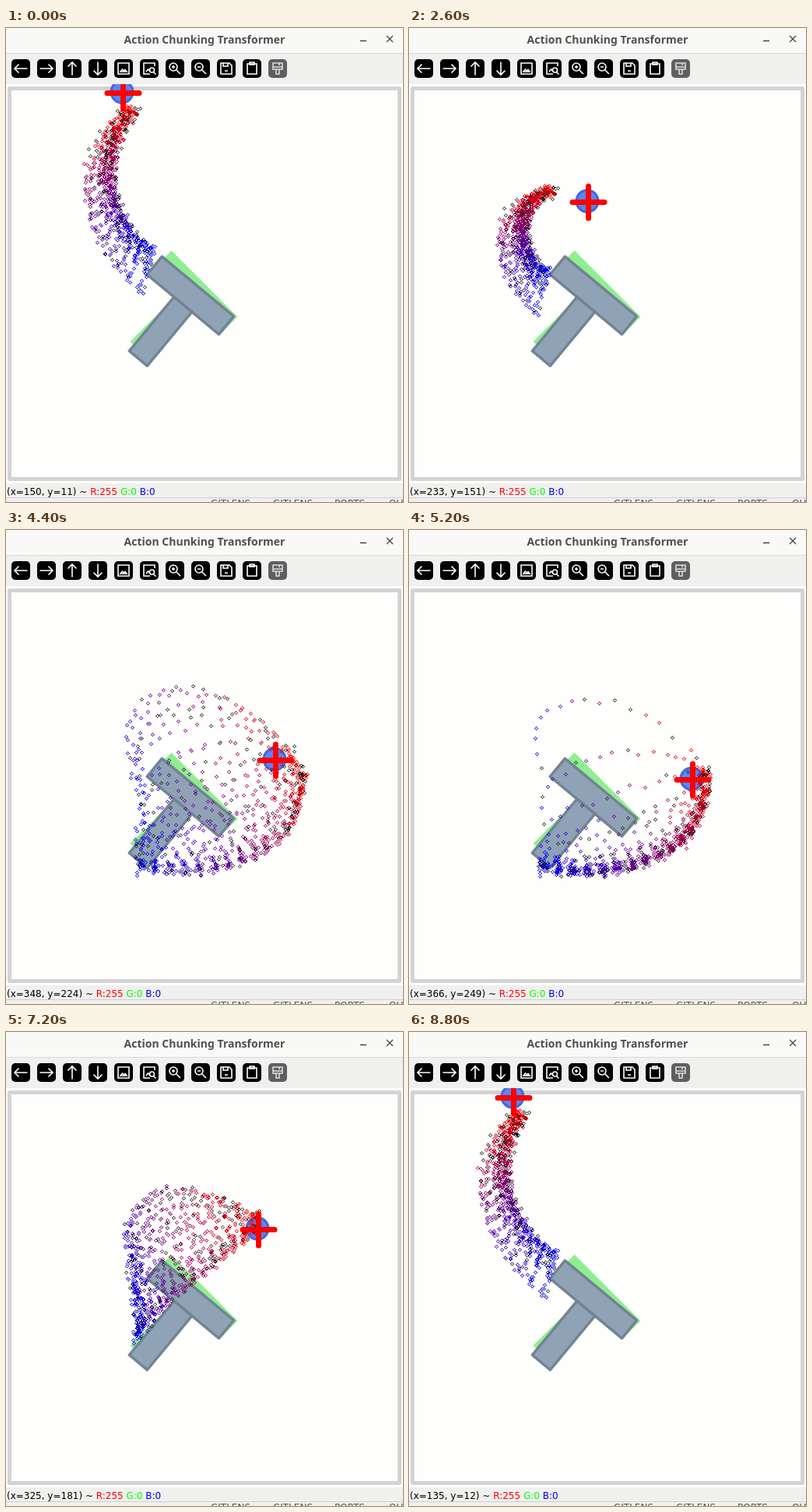
Write an HTML page with a canvas that moves like this. It is 510x608 px and loops after 8990 ms.

```html
<!DOCTYPE html>
<html lang="en">
<head>
<meta charset="utf-8">
<title>Action Chunking Transformer</title>
<style>
html, body { margin: 0; width: 100%; height: 100%; overflow: hidden; background: #f0f0ee; }
canvas { display: block; }
</style>
</head>
<body>
<canvas id="stage" width="510" height="608"></canvas>
<script>
const ctx = document.getElementById('stage').getContext('2d');
const LOOP = 8990, HOLD = 800, STEPS = 120, STEP = 200 / 3;
const SAMPLES = 50, HORIZON = 16, TOP = 72;
const SANS = '12px "DejaVu Sans", sans-serif';

// Blends numbers, or lists of them at any depth
const mix = (a, b, u) => Array.isArray(a) ? a.map((v, i) => mix(v, b[i], u)) : a + (b - a) * u;
const linear = u => u;
const easeIn = u => u * u;
const easeOut = u => 1 - (1 - u) ** 2;

// Bezier paths of the predicted motion
const rise = [[184, 284], [125, 240], [120, 160], [163, 107]];
const lift = [[174, 312], [140, 290], [135, 225], [182, 209]];
const over = [[170, 285], [105, 165], [270, 150], [356, 274]];
const under = [[173, 432], [265, 450], [385, 425], [380, 315]];
const hook = [[175, 290], [125, 250], [150, 175], [270, 186]];
const lean = path => path.map(([x, y], i) => [x - 6 * i, y]);
const fan = path => path.map(([x, y], i) => [x - 12 - 30 * Math.sin(i), y + 55 * (1 - i / 3) ** 2]);

// Samples spread between the paths near and far: bias favours far,
// drop lowers the starts, ease leads to the next pose
const poses = [
  { time: 800, cursor: [150, 83], mouse: [150, 11], near: rise, far: fan(rise), bias: -1.1, drop: 0, ease: easeOut },
  { time: 2600, cursor: [230, 223], mouse: [233, 151], near: lift, far: fan(lift), bias: -1.2, drop: 0, ease: linear },
  { time: 3670, cursor: [329, 273], mouse: [331, 202], near: over, far: under, bias: -.6, drop: 130, ease: linear },
  { time: 5200, cursor: [364, 320], mouse: [366, 249], near: over, far: under, bias: 3.3, drop: 0, ease: linear },
  { time: 6470, cursor: [350, 294], mouse: [351, 222], near: over, far: under, bias: 1.1, drop: 110, ease: linear },
  { time: 8000, cursor: [295, 208], mouse: [296, 136], near: hook, far: fan(hook), bias: -.5, drop: 0, ease: easeIn },
  { time: 8800, cursor: [134, 84], mouse: [135, 12], near: lean(rise), far: fan(lean(rise)), bias: -1.1, drop: 0 }
];

let seed = 7;
function random() {
  seed = (seed * 16807) % 2147483647;
  return seed / 2147483647;
}
const gauss = () => (random() + random() + random() + random() - 2) * 1.73;

const dots = [];
for (let i = 0; i < SAMPLES; i++) {
  const rank = (i + .5) / SAMPLES, logit = Math.log(rank / (1 - rank));
  const sx = gauss() * 3, sy = gauss() * 3, fall = random();
  for (let j = 0; j < HORIZON; j++) {
    const p = j / (HORIZON - 1);
    dots.push({
      p, logit, fall,
      dx: sx + gauss() * 2.2, dy: sy + gauss() * 2.2,
      color: random() < .25 ? '#222' : `rgb(${255 * p | 0},0,${255 * (1 - p) | 0})`
    });
  }
}

const diamond = new Path2D();
for (let x = -2; x <= 2; x++) {
  const y = 2 - Math.abs(x);
  diamond.rect(x, y, 1, 1);
  if (y) diamond.rect(x, -y, 1, 1);
}

function poseAt(t) {
  const n = Math.max(0, poses.findIndex(p => p.time >= t) - 1);
  const a = poses[n], b = poses[n + 1];
  const u = a.ease((t - a.time) / (b.time - a.time));
  const pose = {};
  for (const key of ['cursor', 'mouse', 'near', 'far', 'bias', 'drop']) pose[key] = mix(a[key], b[key], u);
  return pose;
}

// Point on a Bezier path by repeated blending
function along(path, p) {
  while (path.length > 1) path = path.slice(1).map((point, i) => mix(path[i], point, p));
  return path[0];
}

function rect(x, y, w, h, color) {
  ctx.fillStyle = color;
  ctx.fillRect(x, y, w, h);
}

function text(str, x, y, font, color, align = 'left') {
  ctx.font = font;
  ctx.fillStyle = color;
  ctx.textAlign = align;
  ctx.fillText(str, x, y);
  return x + ctx.measureText(str).width;
}

function line(d, color, width) {
  ctx.strokeStyle = color;
  ctx.lineWidth = width;
  ctx.stroke(new Path2D(d));
}

const arrow = 'M20.5 12H4M9.5 6.5L4 12l5.5 5.5';
const lens = 'M15 10a5 5 0 1 1-10 0a5 5 0 1 1 10 0M14 14l5 5';
const icons = [
  arrow, arrow, arrow, arrow,
  'M5 5h14v14H5zM8 16l2.5-3 2 2 1.5-1.5 2 2.5z',
  'M19 9V5H5v14h8M8 16l2.5-3 2 2M18.5 14a3 3 0 1 1-6 0a3 3 0 1 1 6 0M17.5 16.5l3 3',
  lens + 'M10 8v4M8 10h4',
  lens + 'M8 10h4',
  'M5 5h11l3 3v11H5zM8 5v4h6V5M10 15h4',
  'M6 6h12v13H6zM9 4h6v3H9z',
  'M6 5h12v8H6zM6 10h12M10 13v6h4v-6M14 5v3'
];
const turns = [0, 2, 1, 3];

function drawWindow() {
  rect(0, 0, 510, 608, '#f0f0ee');
  rect(0, 0, 510, 32, '#f9f9f7');
  rect(0, 32, 510, 1, '#dadad8');
  rect(0, 602, 510, 1, '#d0d0ce');
  text('Action Chunking Transformer', 255, 20, 'bold 14px "Noto Sans", sans-serif', '#505050', 'center');
  line('M455 16.5h8M489 10l8 8M497 10l-8 8', '#444', 1.3);
  icons.forEach((d, i) => {
    const off = i === icons.length - 1;
    ctx.save();
    ctx.translate(7 + 33 * i, 40);
    ctx.fillStyle = off ? '#5f5f5f' : '#000';
    ctx.beginPath();
    ctx.roundRect(0, 0, 24, 24, 5);
    ctx.fill();
    ctx.translate(12, 12);
    ctx.rotate((turns[i] || 0) * Math.PI / 2);
    ctx.translate(-12, -12);
    line(d, off ? '#ddd' : '#fff', 1.6);
    ctx.restore();
  });
  [['GITLENS', 263], ['GITLENS', 343], ['PORTS', 422], ['OUTPUT', 492]]
    .forEach(([label, x]) => text(label, x, 614, SANS, '#555'));
}

// T block placed by the middle of its top edge
function drawBlock(x, y, degrees, fill, edge) {
  ctx.save();
  ctx.translate(x, y);
  ctx.rotate(degrees * Math.PI / 180);
  ctx.fillStyle = fill;
  ctx.strokeStyle = edge;
  ctx.lineWidth = 3.5;
  for (const box of [[-60, 0, 120, 30], [-15, 30, 30, 90]]) {
    ctx.fillRect(...box);
    if (edge) ctx.strokeRect(...box);
  }
  ctx.restore();
}

function drawBoard() {
  rect(0, TOP, 510, 512, '#fefffc');
  ctx.lineJoin = 'round';
  line('M4.5 77.5h501v501h-501z', '#d3d3d3', 5);
  drawBlock(255, 328, 45, '#90ee90');
  drawBlock(246.5, 331.5, 39.7, '#8fa2b6', '#728494');
  ctx.lineJoin = 'miter';
}

function drawAgent([x, y]) {
  ctx.beginPath();
  ctx.arc(x - 1, y - 1, 14, 0, 7);
  ctx.fillStyle = '#5a86f6';
  ctx.fill();
  ctx.strokeStyle = '#4169e1';
  ctx.lineWidth = 3;
  ctx.stroke();
}

function drawCloud({ near, far, bias, drop }) {
  for (const d of dots) {
    const g = 1 / (1 + Math.exp(-1.5 * (d.logit + bias)));
    const [x, y] = along(mix(near, far, g), d.p);
    const sag = drop * d.fall * (1 - g) * (1 - d.p) ** 1.5;
    ctx.save();
    ctx.translate(Math.round(x + d.dx), Math.round(y + d.dy + sag));
    ctx.fillStyle = d.color;
    ctx.fill(diamond);
    ctx.restore();
  }
}

function drawCross([x, y]) {
  ctx.lineCap = 'round';
  line(`M${x - 20} ${y + .5}h41M${x + .5} ${y - 20}v41`, '#f00', 7);
  ctx.lineCap = 'butt';
}

function drawStatus([x, y]) {
  let end = text(`(x=${x}, y=${y}) ~ `, 1, 599, SANS, '#000');
  end = text('R:255 ', end, 599, SANS, '#f00');
  end = text('G:0 ', end, 599, SANS, '#0f0');
  text('B:0', end, 599, SANS, '#00f');
}

function draw(now) {
  const moved = Math.floor((now % LOOP - HOLD) / STEP + .05);
  const pose = poseAt(HOLD + STEP * Math.min(STEPS, Math.max(0, moved)));
  const cursor = pose.cursor.map(Math.round);
  drawWindow();
  ctx.save();
  ctx.beginPath();
  ctx.rect(0, TOP, 510, 512);
  ctx.clip();
  drawBoard();
  drawAgent(cursor);
  drawCloud(pose);
  drawCross(cursor);
  ctx.restore();
  drawStatus(pose.mouse.map(Math.round));
}

const start = performance.now();
function tick() {
  draw(performance.now() - start);
  requestAnimationFrame(tick);
}
tick();
</script>
</body>
</html>
```
